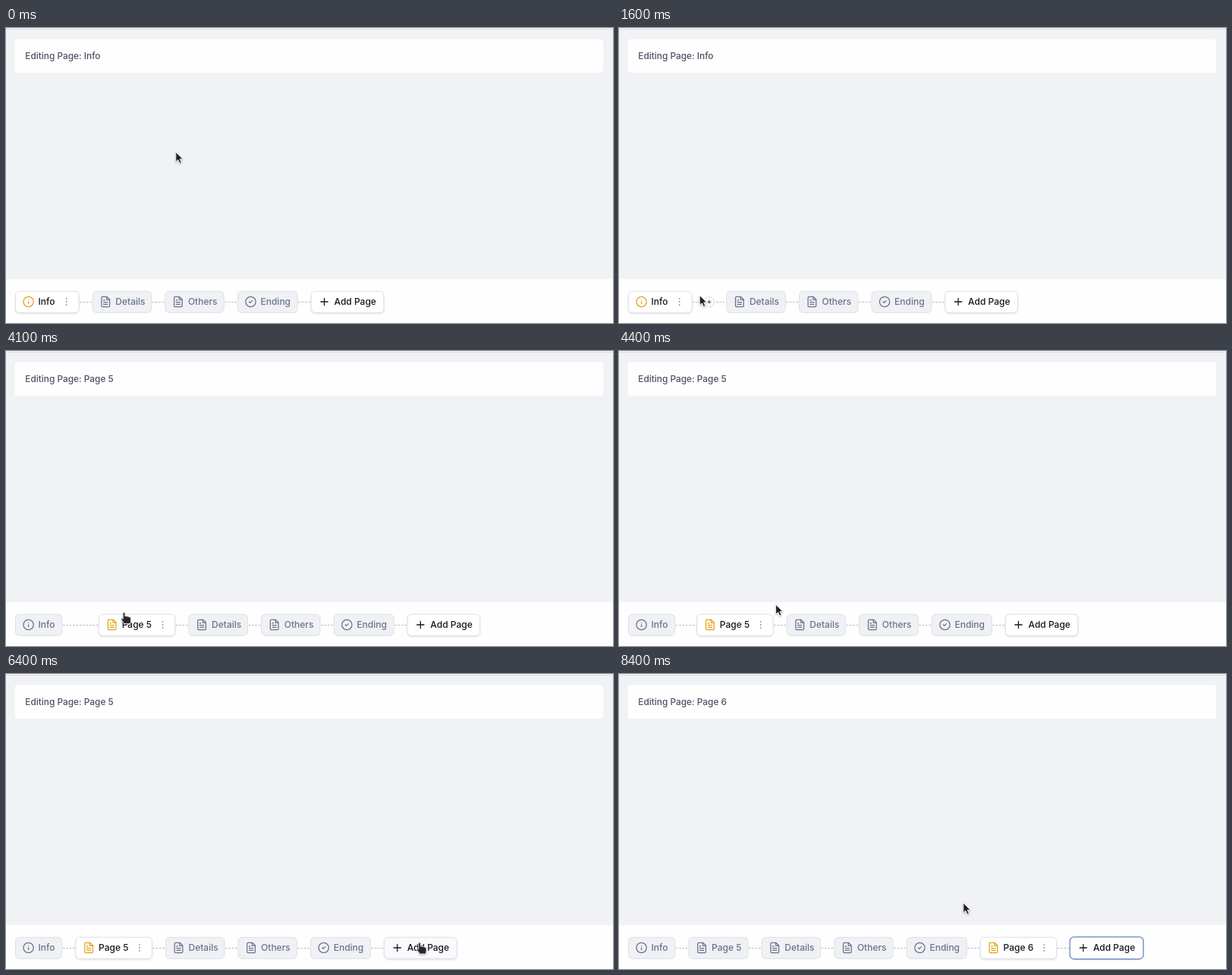
Recreate the animation shown at these times as an HTML page. Size 800x389 px, loop 8500 ms.

```html
<!DOCTYPE html>
<html lang="en">
<head>
<meta charset="utf-8">
<title>Page tabs</title>
<style>
  html, body { margin: 0; width: 100%; height: 100%; overflow: hidden; background: #fefefe; }
  svg { display: block; width: 800px; height: 389px; }
  text { font: 500 12px Inter, "Liberation Sans", sans-serif; }
  #title { font-size: 11.86px; fill: #4b5262; }
  .icon { fill: none; stroke: currentColor; stroke-width: 1.9; stroke-linecap: round; stroke-linejoin: round; }
  .tab { color: #69738a; }
  .tab text { fill: currentColor; }
  .tab rect { fill: #f0f1f4; stroke: #dddfe5; }
  .tab.active rect, .tab.add rect { fill: #fff; stroke: #e0e2e6; filter: drop-shadow(0 1px 1px rgba(0, 0, 0, .13)); }
  .tab.active text, .tab.add { color: #17181d; }
  .tab.active .icon { stroke: #e3a31a; }
  .tab.add .focus { fill: none; stroke: none; filter: none; }
  .tab.add.ring .focus { stroke: #7593cb; stroke-width: 1.3; }
  .tab.add.hover rect:first-child { fill: #f8fafd; }
  .dots { fill: #8b93a3; }
  .link { stroke: #b8bbc2; stroke-dasharray: 2.6 1.8; }
  .plus circle { fill: #fdfdfe; stroke: #d5d8de; }
  .plus path { stroke: #3c3f48; fill: none; }
  .plus.ring circle { fill: #eef2fb; stroke: #6b8ac6; stroke-width: 1.3; }
  .pointer { stroke: #fff; stroke-linejoin: round; filter: drop-shadow(0 1px 1px rgba(0, 0, 0, .3)); }
</style>
</head>
<body>
<svg viewBox="0 0 800 389">
  <rect width="800" height="331" fill="#f1f2f6"/>
  <rect width="800" height="1" fill="#f8f8fa"/>
  <rect y="1" width="800" height="1" fill="#d9dade"/>
  <rect x="11.7" y="14.7" width="775.4" height="44.4" rx="3" fill="#fefefe"/>
  <text id="title" x="25.3" y="41.4"></text>
  <rect y="331" width="800" height="58" fill="#fefefe"/>
  <g id="links"></g>
  <g id="tabs"></g>
  <g id="plus" class="plus"><circle/><path d="M-2.5 0H2.5M0-2.5V2.5"/></g>
  <g id="arrow" class="pointer"><path transform="scale(.92)" fill="#202126" d="M0 0V14.2L3.3 11.2L5.6 16.3L8.2 15.1L5.9 10.2H10.2Z"/></g>
  <g id="hand" class="pointer"><path fill="#26272c" stroke-width=".8" d="M-1.6 1Q-1.6-.4-.3-.4T1.1 1V4.8Q2.4 4 3.6 5Q5 4.4 6.1 5.6Q8.7 5.2 8.7 7.6V11Q8.7 13 7.4 14.6H-.2Q-1 12.4-3.2 10.1Q-4.6 8-3.5 7.4T-1.6 8.6Z"/></g>
</svg>
<script>
const NS = "http://www.w3.org/2000/svg";
const LOOP = 8500, STEP = 100;
const GAP = 17.2, MENU = 22.2, LEFT = 12;
const INSERT_5 = 3200, INSERT_6 = 7200;
const $ = id => document.getElementById(id);

const icons = {
  info: "M12 2a10 10 0 1 0 0 20a10 10 0 1 0 0-20M12 16v-4M12 8h.01",
  page: "M14.5 2H6a2 2 0 0 0-2 2v16a2 2 0 0 0 2 2h12a2 2 0 0 0 2-2V7.5zM14 2v6h6M16 13H8M16 17H8M10 9H8",
  check: "M12 2a10 10 0 1 0 0 20a10 10 0 1 0 0-20M9 12l2 2 4-4",
  add: "M5 12h14M12 5v14"
};

function make(tag, attrs, parent) {
  const el = document.createElementNS(NS, tag);
  for (const key in attrs) el.setAttribute(key, attrs[key]);
  return parent.appendChild(el);
}

function makeTab(label, icon, width, { from = 0, left = 0 } = {}) {
  const g = make("g", { class: "tab" + (icon === "add" ? " add" : "") }, $("tabs"));
  const box = make("rect", { x: .5, y: 347.3, height: 28, rx: 5 }, g);
  make("path", { class: "icon", d: icons[icon], transform: "translate(9.6 353) scale(.667)" }, g);
  make("text", { x: 30.6, y: 365.4 }, g).textContent = label;
  const dots = make("g", { class: "dots" }, g);
  for (const y of [357, 361, 365]) make("circle", { cy: y, r: .9 }, dots);
  const link = make("line", { class: "link", y1: 361.5, y2: 361.5 }, $("links"));
  return { label, width, from, left, g, box, dots, link };
}

const info = makeTab("Info", "info", 62.3, { left: INSERT_5 });
const page5 = makeTab("Page 5", "page", 79, { from: INSERT_5, left: INSERT_6 });
const details = makeTab("Details", "page", 78.4);
const others = makeTab("Others", "page", 78.4);
const ending = makeTab("Ending", "check", 79.8);
const page6 = makeTab("Page 6", "page", 79, { from: INSERT_6 });
const add = makeTab("Add Page", "add", 96.4);
make("rect", { class: "focus", x: -.1, y: 346.6, width: 97, height: 29.4, rx: 5.5 }, add.g);
const tabs = [info, page5, details, others, ending, page6, add];

const between = (t, a, b) => t >= a && t < b;
const activeTab = t => t < INSERT_5 ? info : t < INSERT_6 ? page5 : page6;
const move = (el, x, y) => el.setAttribute("transform", `translate(${x} ${y})`);
const show = (el, on) => el.style.display = on ? "" : "none";

// Smooth 0 to 1 between two times
function ease(t, a, b) {
  const k = Math.min(1, Math.max(0, (t - a) / (b - a)));
  return k * k * (3 - 2 * k);
}

// Pointer moves: start, end, x, y
const hops = [
  [300, 1200, 96.5, 347],
  [1300, 1600, 106.3, 352.5],
  [2100, 2500, 119.8, 356.5],
  [4000, 4100, 155.8, 345],
  [4000, 5200, 434, 286],
  [5400, 5500, 426.2, 294.3],
  [5500, 6300, 552, 354],
  [6300, 6500, 538.6, 355],
  [7800, 8200, 453.8, 301.8]
];
hops[4][0] = hops[3][1];

function pointer(t) {
  let x = 223.8, y = 163.5;
  for (const [a, b, toX, toY] of hops) {
    const k = ease(t, a, b);
    x += (toX - x) * k;
    y += (toY - y) * k;
  }
  return [x, y];
}

// Extra room for the plus button; it reopens after the insert
function plusRoom(t) {
  const open = ease(t, 1300, 1650) * (1 - ease(t, 4100, 4600));
  const reopen = t < INSERT_5 ? 1 : .5 + .5 * ease(t, INSERT_5 - 100, 3500);
  return (29.2 + 1.4 * ease(t, 2500, 2700)) * open * reopen;
}

// The menu dots' room closes once a tab loses focus
function menuRoom(tab, t) {
  if (tab === activeTab(t)) return MENU;
  return tab.left ? MENU * (1 - ease(t, tab.left - 100, tab.left + 300)) : 0;
}

function layTabs(t) {
  const active = activeTab(t);
  let end = null;
  for (const tab of tabs) {
    const visible = t >= tab.from;
    show(tab.g, visible);
    show(tab.link, visible && end !== null);
    if (!visible) continue;
    let x = LEFT;
    if (end !== null) {
      x = end + GAP + (end === info.end ? plusRoom(t) : 0);
      tab.link.setAttribute("x1", end + .5);
      tab.link.setAttribute("x2", x);
    }
    const width = tab.width + menuRoom(tab, t);
    move(tab.g, x, 0);
    tab.box.setAttribute("width", width - 1);
    tab.g.classList.toggle("active", tab === active);
    show(tab.dots, tab === active);
    move(tab.dots, width - 16.8, 0);
    end = tab.end = x + width;
  }
  $("title").textContent = "Editing Page: " + active.label;
}

function render(t) {
  layTabs(t);
  add.g.classList.toggle("ring", between(t, 6700, 7300) || t >= 8400);
  add.g.classList.toggle("hover", between(t, 6200, INSERT_6));

  const plus = $("plus");
  show(plus, between(t, 1400, 4100));
  move(plus, info.end + (GAP + plusRoom(t)) / 2, 361.2);
  plus.style.opacity = ease(t, 1300, 1600);
  plus.firstElementChild.setAttribute("r", between(t, 2600, INSERT_5) ? 7.2 : 6.5);
  plus.classList.toggle("ring", between(t, 3000, INSERT_5));

  const pointing = between(t, 2600, 4200) || between(t, 6200, 8000);
  show($("hand"), pointing);
  show($("arrow"), !pointing);
  move(pointing ? $("hand") : $("arrow"), ...pointer(t));
}

const begin = performance.now();
function tick() {
  const t = (performance.now() - begin) % LOOP;
  render(Math.floor(t / STEP) * STEP);
  requestAnimationFrame(tick);
}
tick();
</script>
</body>
</html>
```
